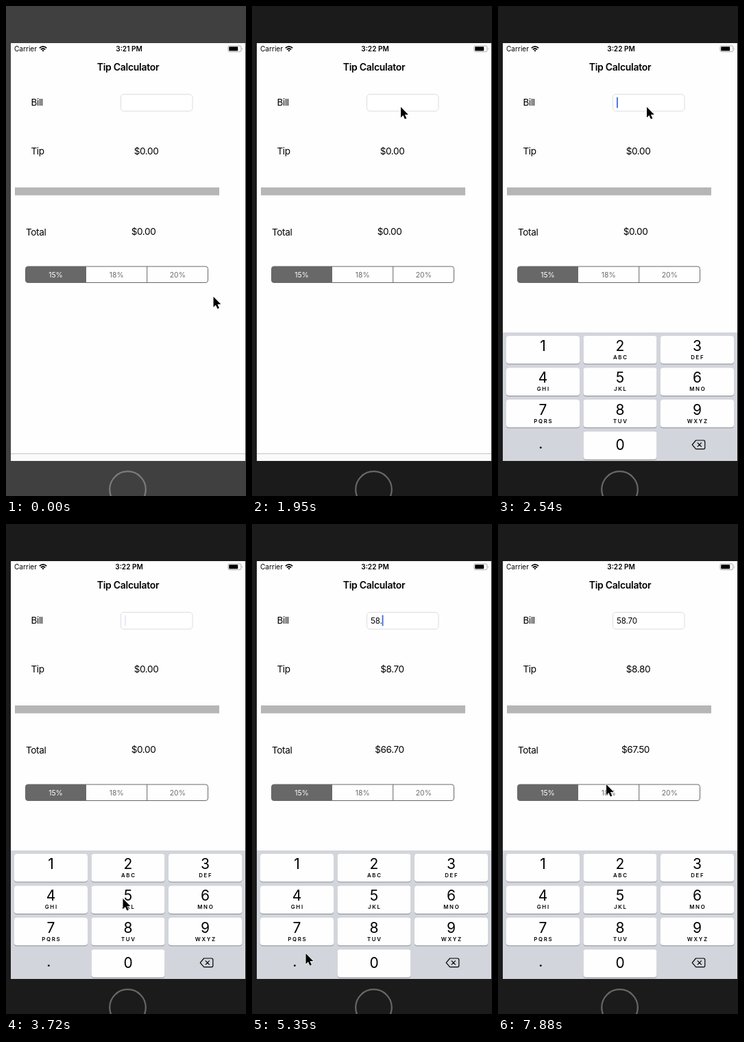
These frames come from a looping animation (350x713 px, 8000 ms). An HTML page:

```html
<!DOCTYPE html>
<html lang="en">
<head>
<meta charset="utf-8">
<title>Tip Calculator</title>
<style>
  html, body { margin: 0; width: 100%; height: 100%; overflow: hidden; }
  svg { display: block; width: 350px; height: 713px; }
  text { font: 13.6px Inter, sans-serif; letter-spacing: -.4px; }
  .mid { text-anchor: middle; }
  .status { font-size: 10.1px; letter-spacing: 0; }
  .bold { font-weight: 600; }
  .title { font-size: 14px; letter-spacing: -.28px; }
  .seg { font-size: 10.4px; letter-spacing: 0; fill: #6b6b6b; }
  .field { font-size: 11.6px; letter-spacing: -.15px; }
  .digit { font-size: 21px; letter-spacing: 0; }
  .letters { font-size: 7.8px; font-weight: 600; letter-spacing: 1.7px; }
</style>
</head>
<body>
<svg viewBox="0 0 350 713">
  <clipPath id="screen"><rect x="7" y="54" width="342" height="608"/></clipPath>
  <rect id="bezel" width="350" height="713"/>
  <circle id="home" cx="177.5" cy="703.5" r="26.3" fill="none" stroke-width="2.2"/>
  <g clip-path="url(#screen)">
    <rect x="7" y="54" width="342" height="608" fill="#fefefe"/>
    <text class="status" x="12" y="66">Carrier</text>
    <g fill="none" stroke="#000" stroke-width="1.7">
      <path d="M48.8 61.2Q54 56.6 59.2 61.2M50.8 63.4Q54 60.6 57.2 63.4"/>
      <path d="M52.3 64.6L54 66.5L55.7 64.6Q54 63.4 52.3 64.6Z" fill="#000" stroke="none"/>
    </g>
    <text id="clock" class="status bold mid" x="179.5" y="66"></text>
    <rect x="323.9" y="58" width="19" height="8.6" rx="2" fill="none" stroke="#999" stroke-width=".8"/>
    <rect x="325.2" y="59.3" width="13" height="6" rx=".8"/>
    <path d="M344.2 60.9Q345.8 62.3 344.2 63.7Z" fill="#999"/>
    <text class="title bold mid" x="178" y="94">Tip Calculator</text>
    <text x="36.5" y="145">Bill</text>
    <text x="36.5" y="216">Tip</text>
    <text x="29" y="334">Total</text>
    <rect x="167.5" y="128.5" width="104.5" height="24.5" rx="4.5" fill="#fff" stroke="#ddd"/>
    <text id="bill" class="field" x="173" y="144.7"></text>
    <rect id="caret" y="132.5" width="1.8" height="16" rx=".8" fill="#4068dc"/>
    <text id="tip" class="mid" x="204.5" y="216"></text>
    <rect x="13" y="264" width="298" height="11.5" fill="#b6b6b6"/>
    <text id="total" class="mid" x="200.5" y="333"></text>
    <rect x="28.5" y="379" width="266" height="23.5" rx="3.5" fill="none" stroke="#686868"/>
    <path d="M117 379H32Q28.5 379 28.5 382.5V399Q28.5 402.5 32 402.5H117Z" fill="#686868"/>
    <path d="M205.7 379V402.5" stroke="#686868"/>
    <text class="seg mid" x="72.5" y="394.5" style="fill:#fff">15%</text>
    <text class="seg mid" x="161.3" y="394.5">18%</text>
    <text class="seg mid" x="250.3" y="394.5">20%</text>
    <rect x="7" y="652" width="342" height="10" fill="#fafafa"/>
    <path d="M7 651.5H349" stroke="#c6c6c6"/>
    <g id="keyboard">
      <rect x="7" y="475" width="342" height="187" fill="#d2d5db"/>
      <g id="keys"></g>
      <circle cx="62.3" cy="642.6" r="1.4"/>
      <path d="M288.6 632H299.6Q301.8 632 301.8 634.2V642.4Q301.8 644.6 299.6 644.6H288.6L283.2 638.3ZM290.8 635.4L296.8 641.4M296.8 635.4L290.8 641.4"
            fill="none" stroke="#000" stroke-width="1.2" stroke-linejoin="round"/>
    </g>
  </g>
  <path id="cursor" d="M0 0V15.2L3.4 12L5.9 17.6L8.4 16.5L5.9 11H10.8Z" stroke="#fff" stroke-width="1.1" paint-order="stroke"/>
</svg>
<script>
const LOOP = 8000, TICK = 148.6;
const $ = id => document.getElementById(id);

// All timelines below are in ticks.
const cursorPath = [
  [1, 302.5, 423], [5, 273, 294], [6, 273, 294], [10, 217, 147], [20, 217, 147],
  [21, 205, 200], [22, 150, 360], [23, 101, 490], [24, 140, 535], [25, 170.5, 545],
  [26, 170.5, 546], [28, 165, 600], [29, 165, 600], [32, 100, 638], [34, 78.5, 625],
  [38, 78.5, 625], [41, 64, 588], [43, 64, 588], [44, 158.5, 641], [49, 158.5, 641],
  [53, 158, 379]
];
const slide = [[14, 187], [15, 72], [16, 8], [17, 0]];
const entries = [[14.5, ''], [27, '5'], [29, '58'], [35, '58.'], [43, '58.7'], [49, '58.70']];
const presses = [[5, 26, 27], [8, 28, 29], [7, 42, 44], [0, 47, 49]];

const letters = ['', '', 'ABC', 'DEF', 'GHI', 'JKL', 'MNO', 'PQRS', 'TUV', 'WXYZ'];
$('keys').innerHTML = letters.map((label, n) => {
  const x = n ? 12 + (n - 1) % 3 * 112.5 : 124.5;
  const y = 480 + (n ? Math.floor((n - 1) / 3) : 3) * 46.4;
  const mid = x + 53.5;
  return `<rect x="${x}" y="${y + 1}" width="107" height="40.5" rx="4" fill="#898b90"/>
    <rect id="key${n}" x="${x}" y="${y}" width="107" height="40.5" rx="4"/>
    <text class="digit mid" x="${mid}" y="${y + (n ? 22 : 26.3)}">${n}</text>
    <text class="letters mid" x="${mid + .8}" y="${y + 34}">${label}</text>`;
}).join('');

function at(track, time) {
  const i = track.findIndex(point => point[0] > time);
  if (i < 0) return track[track.length - 1].slice(1);
  if (i === 0) return track[0].slice(1);
  const a = track[i - 1], b = track[i], k = (time - a[0]) / (b[0] - a[0]);
  return a.slice(1).map((v, j) => v + (b[j + 1] - v) * k);
}

const money = cents => '$' + (cents / 100).toFixed(2);

function caretOpacity(seconds) {
  const phase = seconds % 1;
  if (seconds < 0) return 0;
  if (phase < .45) return 1;
  return Math.max(0, 1 - (phase - .45) / .13, (phase - .87) / .13);
}

function draw(ms) {
  const tick = Math.floor(ms / TICK);
  const active = tick >= 13;
  $('bezel').setAttribute('fill', active ? '#1b1b1b' : '#404040');
  $('home').setAttribute('stroke', active ? '#686868' : '#7c7c7c');
  $('clock').textContent = active ? '3:22 PM' : '3:21 PM';

  const [since, bill] = entries.filter(e => e[0] <= tick).pop() || entries[0];
  const cents = Math.round(bill * 100), tip = Math.floor(cents * .15 + 1e-6);
  $('bill').textContent = bill;
  $('tip').textContent = money(tip);
  $('total').textContent = money(cents + tip);
  $('caret').setAttribute('x', 173 + (bill ? $('bill').getComputedTextLength() : 0));
  $('caret').setAttribute('opacity', caretOpacity((tick - since) * TICK / 1000));

  $('keyboard').setAttribute('transform', `translate(0 ${at(slide, tick)[0]})`);
  letters.forEach((_, n) => {
    const down = presses.some(([key, from, to]) => key === n && tick >= from && tick < to);
    $('key' + n).setAttribute('fill', down ? '#aeb3be' : '#fefefe');
  });
  $('cursor').setAttribute('transform', `translate(${at(cursorPath, tick)})`);
}

const start = performance.now();
(function loop() {
  draw((performance.now() - start) % LOOP);
  requestAnimationFrame(loop);
})();
</script>
</body>
</html>
```
